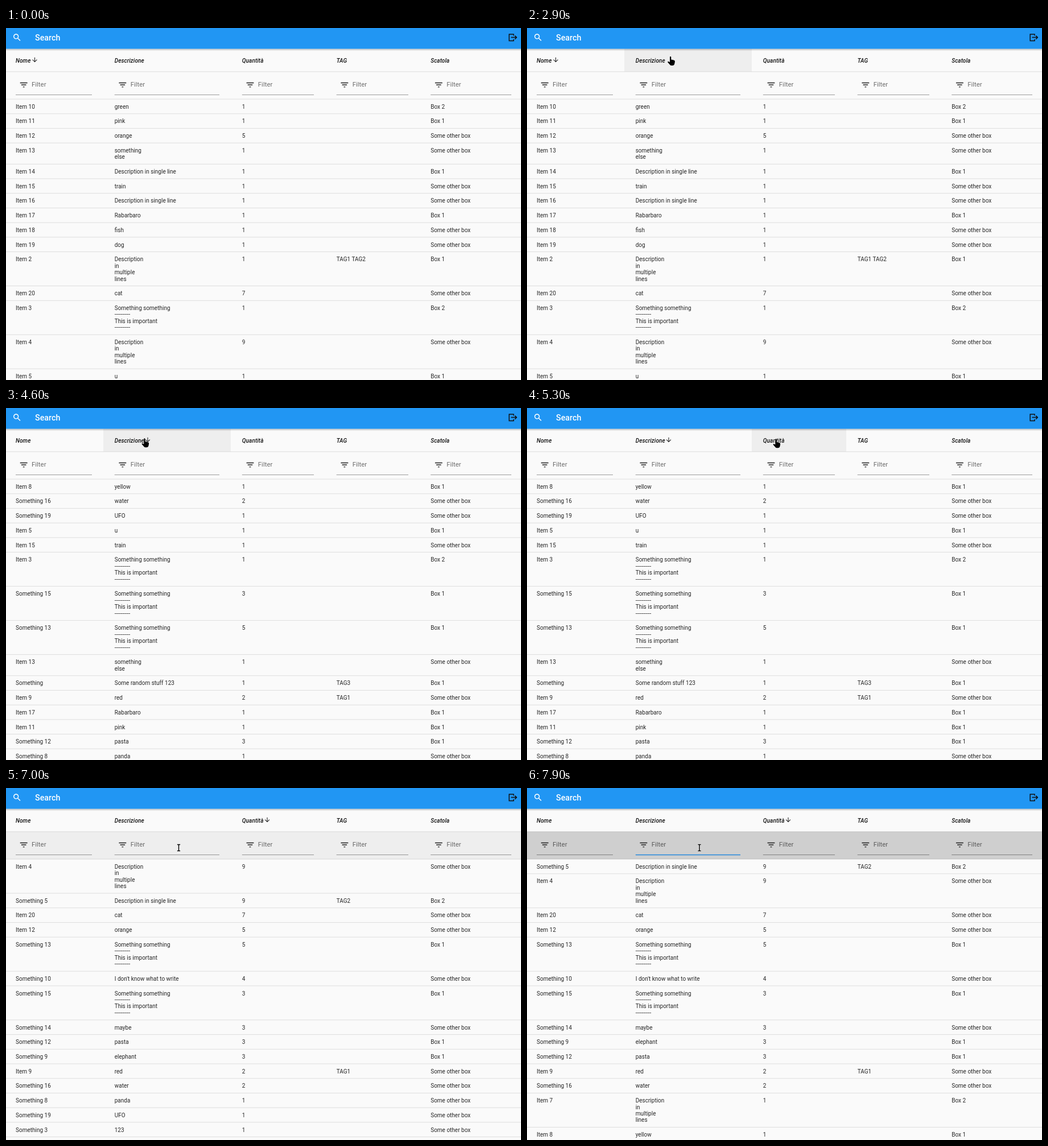
An HTML page for the animation above (8 s loop, 905 by 619 pixels).

```html
<!DOCTYPE html>
<html lang="it">
<head>
<meta charset="utf-8">
<title>Search</title>
<style>
  html, body { margin: 0; width: 100%; height: 100%; overflow: hidden; background: #fafafa; }
  svg { display: block; width: 100%; height: 100%; }
  text { font: 10px Roboto, sans-serif; fill: rgba(0, 0, 0, .85); white-space: pre; }
  .head { font-style: italic; font-weight: 500; letter-spacing: .1px; fill: #111; }
  .hint { font-size: 11.43px; fill: rgba(0, 0, 0, .56); }
  .title { font-size: 14.29px; font-weight: 500; fill: #fff; }
</style>
</head>
<body>
<svg id="stage" viewBox="0 0 905 619"></svg>
<script>
const COLUMNS = [
  { title: 'Nome', x: 17, end: 151, left: 0, right: 171 },
  { title: 'Descrizione', x: 190.7, end: 375, left: 171, right: 395 },
  { title: 'Quantità', x: 414.8, end: 541, left: 395, right: 561 },
  { title: 'TAG', x: 580.7, end: 707, left: 561, right: 726 },
  { title: 'Scatola', x: 746.2, end: 888, left: 726, right: 905 },
];
const ROW = 25.71, LINE = 11.43, TABLE_TOP = 125.2;

const MULTI = 'Description\nin\nmultiple\nlines';
const SINGLE = 'Description in single line';
const NOTE = 'Something something\n----------\nThis is important\n----------';
const OTHER = 'Some other box';

// key: [description, quantity, box, tags]
const ITEMS = {
  I2: [MULTI, 1, 'Box 1', 'TAG1 TAG2'],
  I3: [NOTE, 1, 'Box 2'],
  I4: [MULTI, 9, OTHER],
  I5: ['u', 1, 'Box 1'],
  I6: ['', 1, 'Box 2'],
  I7: [MULTI, 1, 'Box 2'],
  I8: ['yellow', 1, 'Box 1'],
  I9: ['red', 2, OTHER, 'TAG1'],
  I10: ['green', 1, 'Box 2'],
  I11: ['pink', 1, 'Box 1'],
  I12: ['orange', 5, OTHER],
  I13: ['something\nelse', 1, OTHER],
  I14: [SINGLE, 1, 'Box 1'],
  I15: ['train', 1, OTHER],
  I16: [SINGLE, 1, OTHER],
  I17: ['Rabarbaro', 1, 'Box 1'],
  I18: ['fish', 1, OTHER],
  I19: ['dog', 1, OTHER],
  I20: ['cat', 7, OTHER],
  S: ['Some random stuff 123', 1, 'Box 1', 'TAG3'],
  S2: ['', 1, 'Box 2'],
  S3: ['123', 1, OTHER],
  S4: ['A\nB\nC\nD\nE', 1, 'Box 1'],
  S5: [SINGLE, 9, 'Box 2', 'TAG2'],
  S6: ['crocodile', 0, 'Box 1'],
  S7: ['bird', 1, OTHER],
  S8: ['panda', 1, OTHER],
  S9: ['elephant', 3, 'Box 1'],
  S10: ["I don't know what to write", 4, OTHER],
  S11: ['goat', 1, OTHER],
  S12: ['pasta', 3, 'Box 1'],
  S13: [NOTE, 5, 'Box 1'],
  S14: ['maybe', 3, OTHER],
  S15: [NOTE, 3, 'Box 1'],
  S16: ['water', 2, OTHER],
  S17: ['chicken', 1, 'Box 2'],
  S18: ['barbagianni', 1, 'Box 1'],
  S19: ['UFO', 1, OTHER],
  S20: ['And....\ndone.', 1, 'Box 2'],
};

// Each view starts at a time, shows a sort arrow (centre x, turn) and a row order.
const VIEWS = [
  { from: 0, arrow: [50.5, 180], keys: 'I10 I11 I12 I13 I14 I15 I16 I17 I18 I19 I2 I20 I3 I4 I5' },
  { from: 3200, arrow: [249, 0], keys: 'S2 I6 S3 S4 S20 S18 S7 I20 S17 S6 I4 I7 I2' },
  { from: 4600, arrow: [249, 180], keys: 'I8 S16 S19 I5 I15 I3 S15 S13 I13 S I9 I17 I11 S12 S8' },
  { from: 5600, arrow: [459, 0], keys: 'S6 S7 S19 I5 I15 I3 S11 I6 I13 S I17 I11 I8 S8 S3 S4' },
  { from: 6600, arrow: [459, 180], keys: 'I4 S5 I20 I12 S13 S10 S15 S14 S12 S9 I9 S16 S8 S19 S3' },
  { from: 7400, arrow: [459, 180], keys: 'S5 I4 I20 I12 S13 S10 S15 S14 S9 S12 I9 S16 I7 I8' },
];

const text = (x, y, content, cls = '') => `<text x="${x}" y="${y}" class="${cls}">${content}</text>`;
const rect = (x, y, w, h, fill, extra = '') =>
  `<rect x="${x}" y="${y}" width="${w}" height="${h}" fill="${fill}" ${extra}/>`;
const icon = (x, y, scale, d, fill) =>
  `<path transform="translate(${x} ${y}) scale(${scale})" d="${d}" fill="${fill}"/>`;
const divider = y => rect(0, y - .6, 905, .9, 'rgba(0,0,0,.13)');

function tableView({ arrow: [arrowX, turn], keys }) {
  let y = TABLE_TOP;
  const rows = keys.split(' ').map(key => {
    const [description, quantity, box, tags = ''] = ITEMS[key];
    const name = `${key[0] === 'I' ? 'Item' : 'Something'} ${key.slice(1)}`;
    const lines = description.split('\n');
    const base = y + 16.5;
    y += ROW + LINE * (lines.length - 1);
    return [name, '', quantity, tags, box].map((cell, i) => text(COLUMNS[i].x, base, cell)).join('')
      + lines.map((line, i) => text(COLUMNS[1].x, base + i * LINE, line)).join('')
      + divider(y);
  });
  const arrow = `<path transform="translate(${arrowX} 56) rotate(${turn}) scale(.536) translate(-12 -12)"
    d="M4 12l1.41 1.41L11 7.83V20h2V7.83l5.58 5.59L20 12l-8-8-8 8z" fill="#222"/>`;
  return `<g class="view">${arrow}${rows.join('')}</g>`;
}

const FILTER_ICON = 'M10 18h4v-2h-4v2zM3 6v2h18V6H3zm3 7h12v-2H6v2z';
const SEARCH_ICON = 'M15.5 14h-.79l-.28-.27C15.41 12.59 16 11.11 16 9.5 16 5.91 13.09 3 9.5 3S3 5.91 3 9.5 5.91 16 9.5 16c1.61 0 3.09-.59 4.23-1.57l.27.28v.79l5 4.99L20.49 19l-4.99-5zm-6 0C7.01 14 5 11.99 5 9.5S7.01 5 9.5 5 14 7.01 14 9.5 11.99 14 9.5 14z';

const headHover = (id, { left, right }) => rect(left, 36.5, right - left, 40, '#eee', `id="${id}"`);
const columnHead = ({ title, x, end }) =>
  text(x, 60.5, title, 'head')
  + icon(x + 5.6, 91.5, .714, FILTER_ICON, '#1c1c1c')
  + text(x + 28, 103.4, 'Filter', 'hint')
  + rect(x, 117, end - x, .9, 'rgba(0,0,0,.42)');

document.getElementById('stage').innerHTML = `
  <defs><linearGradient id="shade" x2="0" y2="1">
    <stop stop-color="#000" stop-opacity=".25"/><stop offset="1" stop-color="#000" stop-opacity="0"/>
  </linearGradient></defs>
  ${rect(0, 0, 905, 619, '#fafafa')}
  ${headHover('hoverDescription', COLUMNS[1])}
  ${headHover('hoverQuantity', COLUMNS[2])}
  ${rect(0, 76.7, 905, 48.5, '#eee', 'id="filterRow"')}
  ${divider(77)}${divider(TABLE_TOP)}
  ${COLUMNS.map(columnHead).join('')}
  ${rect(191, 116.8, 184, 1.5, '#2488dc', 'id="focusLine"')}
  ${rect(218.5, 93.5, .8, 12.5, '#222', 'id="caret"')}
  ${VIEWS.map(tableView).join('')}
  ${rect(0, 36.5, 905, 4, 'url(#shade)')}
  ${rect(0, 0, 905, 36.6, '#2196f3')}
  ${icon(10.9, 8.2, .714, SEARCH_ICON, '#fff')}
  ${text(51, 22, 'Search', 'title')}
  <path d="M892 13.6V10.9H884.2V22.4H892V19.7M887.5 16.6H897M894.3 13.6L897.3 16.6 894.3 19.6"
    fill="none" stroke="#111" stroke-width="1.5"/>
  <path id="hand" d="M4 1.2Q4 0 5.1 0T6.3 1.2V5.4L11 6.6Q13.2 7.2 12.9 9.4L12.2 13Q11.6 16 8.6 16H6.8Q5.2 16 4 14.5L.5 10.4Q-.2 9 1.2 8.7L4 10Z"
    stroke="#fff" stroke-width=".7" paint-order="stroke"/>
  <g id="beam" fill="none">
    <path d="M-2.6-5.4H2.6M-2.6 5.4H2.6M0-5.4V5.4" stroke="#fff" stroke-width="2.6"/>
    <path d="M-2.6-5.4H2.6M-2.6 5.4H2.6M0-5.4V5.4" stroke="#000" stroke-width="1.5"/>
  </g>`;

const [hoverDescription, hoverQuantity, filterRow, focusLine, caret, hand, beam] =
  ['hoverDescription', 'hoverQuantity', 'filterRow', 'focusLine', 'caret', 'hand', 'beam']
    .map(id => document.getElementById(id));
const views = [...document.querySelectorAll('.view')];

const POINTER = [
  [1900, 310, 104], [2200, 248, 50], [2800, 248, 50], [2900, 247, 50], [3700, 247, 50], [4000, 238.3, 53.3],
  [4700, 238.3, 53.3], [5300, 432.3, 54.3], [6600, 432.3, 54.3],
  [7000, 303.5, 105], [7700, 303.5, 105], [7800, 303, 105],
];

const ramp = (t, from, to) => Math.min(1, Math.max(0, (t - from) / (to - from)));
const smooth = p => p * p * (3 - 2 * p);
const show = (node, on) => node.setAttribute('visibility', on ? 'visible' : 'hidden');
const fade = (node, opacity) => node.setAttribute('opacity', opacity);

function pointerAt(t) {
  let [, x, y] = POINTER[0];
  for (let i = 1; i < POINTER.length; i++) {
    const [from, x0, y0] = POINTER[i - 1], [to, x1, y1] = POINTER[i];
    if (t < from) break;
    const p = smooth(ramp(t, from, to));
    x = x0 + (x1 - x0) * p;
    y = y0 + (y1 - y0) * p;
  }
  return [x, y];
}

function render(time) {
  const t = Math.floor(time / 100) * 100;
  const current = VIEWS.findLastIndex(view => t >= view.from);
  views.forEach((view, i) => show(view, i === current));

  fade(hoverDescription, ramp(t, 1900, 2200) - ramp(t, 4900, 5200));
  fade(hoverQuantity, ramp(t, 4900, 5200) - ramp(t, 6700, 7000));
  fade(filterRow, ramp(t, 6700, 7000));
  const gray = Math.round(238 - 31 * ramp(t, 7300, 7600));
  filterRow.setAttribute('fill', `rgb(${gray},${gray},${gray})`);

  const width = 184 * (1 - (1 - ramp(t, 7300, 7600)) ** 2);
  focusLine.setAttribute('x', 283 - width / 2);
  focusLine.setAttribute('width', width);
  show(caret, t >= 7400 && t < 7900);

  const [x, y] = pointerAt(t);
  const typing = t >= 6900;
  show(hand, t >= 2000 && !typing);
  show(beam, typing);
  (typing ? beam : hand).setAttribute('transform', `translate(${x} ${y})`);
}

const start = performance.now();
function tick() {
  render((performance.now() - start) % 8000);
  requestAnimationFrame(tick);
}
tick();
</script>
</body>
</html>
```
